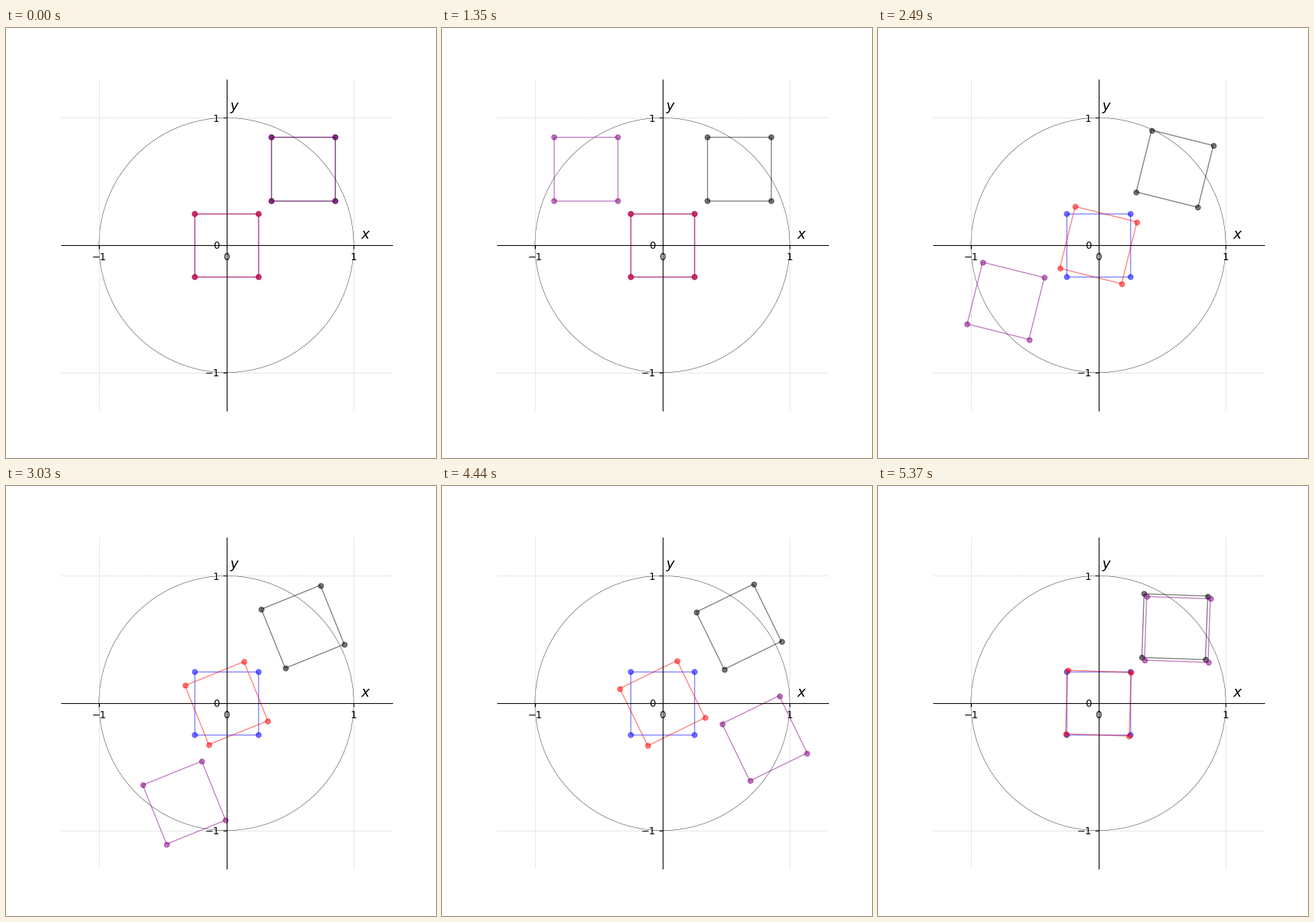
A matplotlib script for the animation above (5400 ms loop, 600 by 600 pixels).

```python
import numpy as np
import matplotlib.pyplot as plt
from matplotlib.animation import FuncAnimation
from matplotlib.patches import Circle

FRAMES = 180
INTERVAL = 30
CENTER = np.array([0.6, 0.6])
CORNERS = 0.25 * np.array([[1, 1], [-1, 1], [-1, -1], [1, -1], [1, 1]])

plt.rcParams["font.family"] = "DejaVu Sans"

fig, ax = plt.subplots(figsize=(6, 6), dpi=100)
fig.subplots_adjust(left=0.125, right=0.9, bottom=0.11, top=0.88)
ax.set_aspect("equal")
ax.set(xlim=(-1.3, 1.3), ylim=(-1.3, 1.3),
       xticks=[-1, 0, 1], yticks=[-1, 0, 1])

# Axes through the origin
for side in ("left", "bottom"):
    ax.spines[side].set_position("zero")
for side in ("right", "top"):
    ax.spines[side].set_visible(False)
ax.grid(linestyle=":", linewidth=0.6)
ax.text(1.055, 0.048, "$x$", fontsize=14)
ax.text(0.025, 1.057, "$y$", fontsize=14)
ax.add_patch(Circle((0, 0), 1, fill=False, ec="black", lw=0.3))


def square(color, points):
    # The closing point gets no second marker
    line, = ax.plot(*points.T, "o-", color=color, lw=1, ms=5,
                    alpha=0.5, markevery=slice(0, 4))
    return line


def rotate(points, angle):
    c, s = np.cos(angle), np.sin(angle)
    return points @ np.array([[c, s], [-s, c]])


square("blue", CORNERS)
spin = square("red", CORNERS)
spin_away = square("black", CORNERS + CENTER)
orbit = square("purple", CORNERS + CENTER)


def update(i):
    angle = 2 * np.pi * i / FRAMES
    turned = rotate(CORNERS, angle)
    spin.set_data(*turned.T)
    spin_away.set_data(*(turned + CENTER).T)
    orbit.set_data(*rotate(CORNERS + CENTER, angle).T)
    return spin, spin_away, orbit


anim = FuncAnimation(fig, update, frames=FRAMES, interval=INTERVAL,
                     repeat=True, repeat_delay=0)
plt.show()
```
